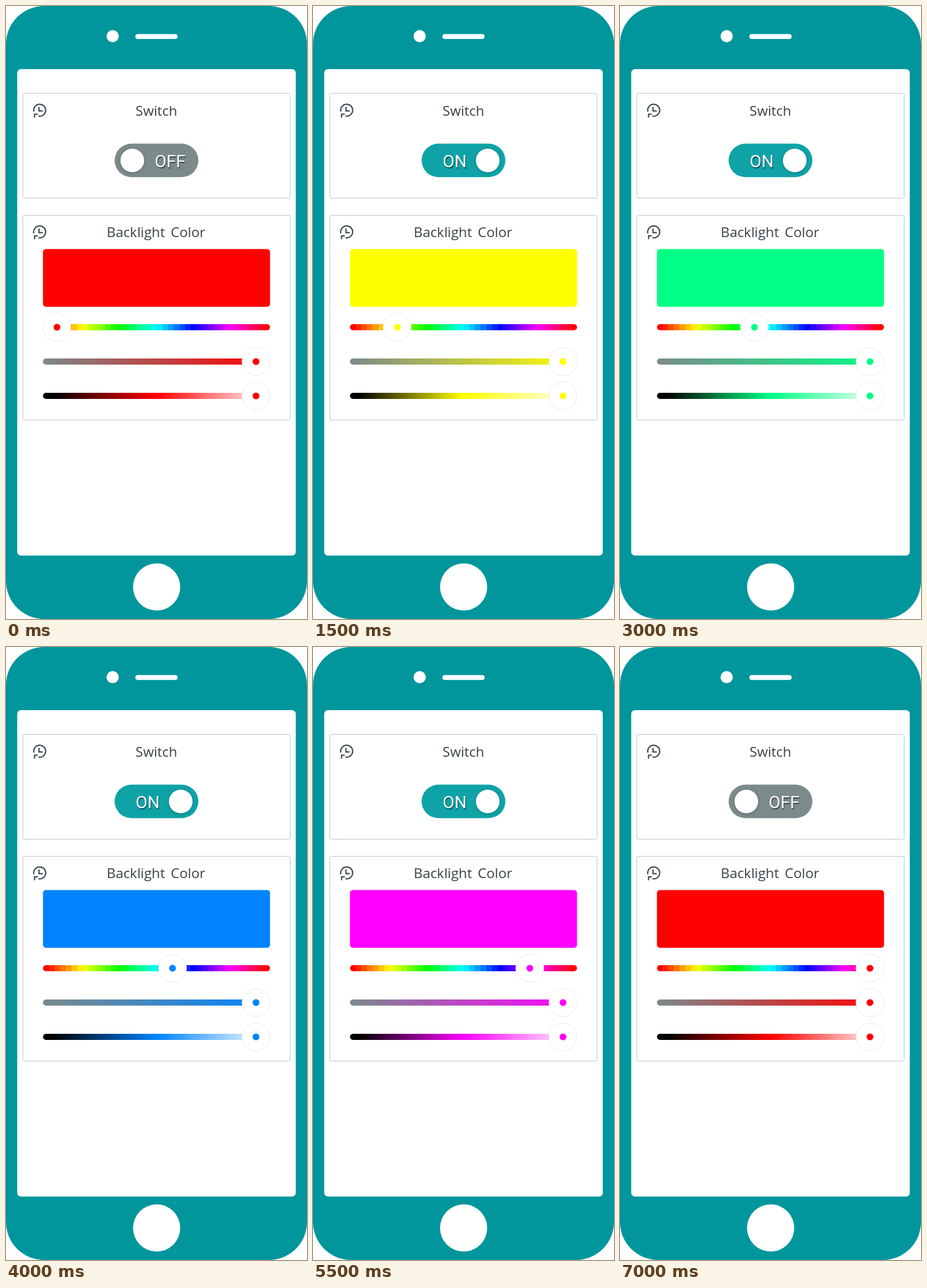
These frames come from a looping animation (491 by 1000 pixels, 7500 ms). An HTML page:

```html
<!DOCTYPE html>
<html lang="en">
<head>
<meta charset="utf-8">
<title>Backlight control</title>
<style>
  html, body { margin: 0; width: 100%; height: 100%; overflow: hidden; background: #fff; }
  svg { display: block; width: 491px; height: 1000px; --color: #f00; }
  .title { font: 22.5px "Open Sans", sans-serif; fill: #374146; }
  .state { font: 28px Roboto, sans-serif; fill: #fff; text-shadow: 1px 2px 1px rgba(0, 0, 0, .5); }
  .card { fill: #fff; stroke: #bccaca; }
  .icon { fill: none; stroke: #374349; stroke-width: 2; }
  .tint { fill: var(--color); }
  .tint-stop { stop-color: var(--color); }
  .knob { fill: #fff; filter: drop-shadow(0 1px 2px rgba(0, 0, 0, .25)); }
  .thumb { fill: #fff; stroke: #e9ebeb; }
</style>
</head>
<body>
<svg id="stage" viewBox="0 0 491 1000">
  <defs>
    <linearGradient id="saturation">
      <stop offset="0" stop-color="#7b8a8b"/>
      <stop offset="1" class="tint-stop"/>
    </linearGradient>
    <linearGradient id="lightness">
      <stop offset="0" stop-color="#000"/>
      <stop offset=".04" stop-color="#000"/>
      <stop offset=".5" class="tint-stop"/>
      <stop offset="1" stop-color="#fff"/>
    </linearGradient>
    <clipPath id="track"><rect x="60.3" y="519" width="370.4" height="10" rx="5"/></clipPath>
    <g id="history" class="icon">
      <path d="M-9.6 2.2A9.8 9.8 0 1 1 -2 9.6"/>
      <path d="M-8.4 12V6.6H-3.2"/>
      <path d="M-1.2 -5.6V1.2H5"/>
    </g>
    <g id="thumb">
      <circle class="thumb" r="22.8"/>
      <circle class="tint" r="5.5"/>
    </g>
  </defs>

  <rect width="491" height="1000" rx="62" fill="#00969c"/>
  <circle cx="174" cy="49.3" r="10" fill="#fff"/>
  <rect x="211" y="45.7" width="69" height="8" rx="4" fill="#fff"/>
  <rect x="18.3" y="103" width="454.4" height="793.5" rx="6" fill="#fff"/>
  <circle cx="245.7" cy="947.7" r="38.5" fill="#fff"/>

  <rect class="card" x="27.5" y="142.5" width="436" height="171" rx="2"/>
  <use href="#history" x="55" y="170"/>
  <text class="title" x="211.3" y="179">Switch</text>
  <rect id="pill" x="177.2" y="224.6" width="136.6" height="54.6" rx="27.3"/>
  <text id="state" class="state" y="263"></text>
  <circle id="knob" class="knob" cy="252" r="19.3"/>

  <rect class="card" x="27.5" y="341.5" width="436" height="334" rx="2"/>
  <use href="#history" x="55" y="368.5"/>
  <text class="title" y="377"><tspan x="164.3">Backlight</tspan> <tspan x="268.7">Color</tspan></text>
  <rect class="tint" x="60.3" y="396.4" width="370.4" height="94.4" rx="5"/>

  <g id="hues" clip-path="url(#track)" shape-rendering="crispEdges"></g>
  <rect x="60.3" y="575" width="370.4" height="10" rx="5" fill="url(#saturation)"/>
  <rect x="60.3" y="631" width="370.4" height="10" rx="5" fill="url(#lightness)"/>
  <use id="hueThumb" href="#thumb" y="524"/>
  <use href="#thumb" x="407.8" y="580"/>
  <use href="#thumb" x="407.8" y="636"/>
</svg>
<script>
  const byId = id => document.getElementById(id);
  const STEP = 500;
  const HUES = [0, 0, 31, 60, 91, 120, 151, 180, 209, 240, 270, 300, 330, 360, 360];
  const BANDS = 40;

  for (let i = 0; i < BANDS; i++) {
    const band = document.createElementNS(byId("stage").namespaceURI, "rect");
    const width = 370.4 / BANDS;
    const attributes = {
      x: 60.3 + i * width, y: 519, width: width + 0.5, height: 10,
      fill: `hsl(${i * 360 / (BANDS - 1)}, 100%, 50%)`
    };
    for (const name in attributes) band.setAttribute(name, attributes[name]);
    byId("hues").append(band);
  }

  function show(step) {
    const hue = HUES[step];
    const on = step > 0 && step < HUES.length - 1;
    byId("stage").style.setProperty("--color", `hsl(${hue}, 100%, 50%)`);
    byId("hueThumb").setAttribute("x", 83.1 + hue * 324.7 / 360);
    byId("pill").setAttribute("fill", on ? "#0fa3a7" : "#7b8a8b");
    byId("knob").setAttribute("cx", on ? 285 : 206);
    byId("state").setAttribute("x", on ? 211.4 : 242.4);
    byId("state").textContent = on ? "ON" : "OFF";
  }

  let shown = 0;
  const start = performance.now();
  show(0);

  function tick(now) {
    const step = Math.floor(Math.max(0, now - start) / STEP) % HUES.length;
    if (step !== shown) show(shown = step);
    requestAnimationFrame(tick);
  }
  requestAnimationFrame(tick);
</script>
</body>
</html>
```
